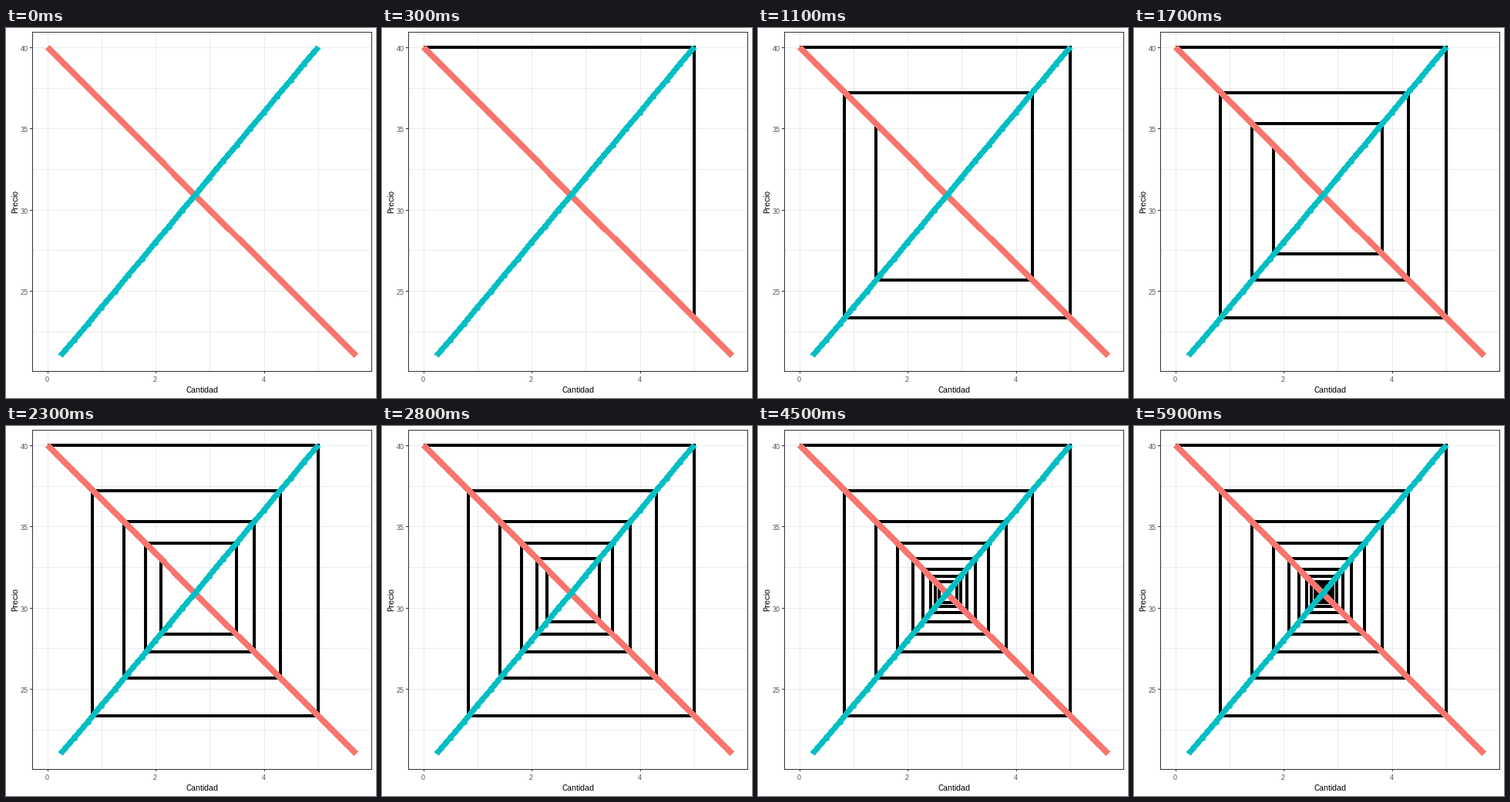
Write a matplotlib script that moves like this. It is 480 by 480 pixels and loops after 10000 ms.

```python
import matplotlib.pyplot as plt
import numpy as np
from matplotlib.animation import FuncAnimation
from matplotlib.patches import Rectangle

SIZE, DPI = 480, 100
FRAMES, INTERVAL = 100, 100
PERIODS = 35
LEFT, TOP, RIGHT, BOTTOM = 34, 5, 474, 445

plt.rcParams.update({
    "font.family": "Liberation Sans",
    "text.hinting": "native",
    "text.hinting_factor": 1,
})


def pt(px):
    return px * 72 / DPI


def x_px(q):
    return np.floor(54.4 + np.asarray(q) * 400 / 5.7)


def y_px(p):
    return np.floor(25.6 + (40 - np.asarray(p)) * 400 / 19)


def demand(q):
    return 40 - q * 10 / 3


def demand_quantity(p):
    return (40 - p) * 0.3


def supply_quantity(p):
    return (p - 20) / 4


fig = plt.figure(figsize=(SIZE / DPI, SIZE / DPI), dpi=DPI, facecolor="white")
ax = fig.add_axes([0, 0, 1, 1])
ax.set_xlim(0, SIZE)
ax.set_ylim(SIZE, 0)
ax.axis("off")


def bar(x, y, w, h, color, z):
    ax.add_patch(Rectangle((x, y), w, h, facecolor=color, linewidth=0,
                           antialiased=False, zorder=z))


def label(x, y, text, size, color, **kw):
    ax.text(x, y, text, fontsize=pt(size), color=color, zorder=6, **kw)


def stroke(x, y, color, width, z):
    line, = ax.plot(x, y, color=color, linewidth=pt(width), zorder=z,
                    antialiased=False, snap=False,
                    solid_capstyle="butt", solid_joinstyle="round")
    return line


def curve(quantity_at, color, z):
    """Thick line whose round joints bulge slightly below it."""
    prices = np.arange(21, 41)
    x, y = x_px(quantity_at(prices)), y_px(prices)
    stroke(x, y, color, 6, z)
    ax.plot(x[1:-1], y[1:-1] + 0.5, "o", color=color, markersize=pt(7),
            markeredgewidth=0, antialiased=False, snap=False, zorder=z)


# Panel: grid, border, ticks and labels
for q in range(6):
    bar(x_px(q), TOP, 1, BOTTOM - TOP, "#EBEBEB", 1)
for p in np.arange(22.5, 41, 2.5):
    bar(LEFT, y_px(p), RIGHT - LEFT, 1, "#EBEBEB", 1)
for x in (LEFT, RIGHT):
    bar(x, TOP, 1, BOTTOM - TOP + 1, "#333333", 5)
for y in (TOP, BOTTOM):
    bar(LEFT, y, RIGHT - LEFT + 1, 1, "#333333", 5)
for q in (0, 2, 4):
    bar(x_px(q), BOTTOM, 1, 3, "#333333", 5)
    label(x_px(q) - 0.5, 459, str(q), 9, "#4D4D4D", ha="center")
for p in (25, 30, 35, 40):
    bar(LEFT - 3, y_px(p), 3, 1, "#333333", 5)
    label(29, y_px(p) + 5, str(p), 9, "#4D4D4D", ha="right")
label(254, 473, "Cantidad", 11, "black", ha="center")
label(15, 225, "Precio", 11, "black", rotation=90, rotation_mode="anchor",
      ha="center", va="baseline")

curve(demand_quantity, "#F8766D", 3)
curve(supply_quantity, "#00BFC4", 4)

# Cobweb: each period moves across to supply, then jumps to demand
quantity = [0.0]
for _ in range(PERIODS):
    quantity.append(supply_quantity(demand(quantity[-1])))
price = [demand(q) for q in quantity]
starts = [round(t * (FRAMES - 1) / PERIODS) for t in range(PERIODS + 1)]
web = stroke([], [], "black", 4, 2)


def draw(frame):
    t = max(i for i, s in enumerate(starts) if s <= frame)
    qs, ps = [quantity[0]], [price[0]]
    for i in range(1, t + 1):
        qs += [quantity[i]] * 2
        ps += [price[i - 1], price[i]]
    if t < PERIODS:
        part = (frame - starts[t]) / (starts[t + 1] - starts[t])
        if part > 0:
            qs.append(quantity[t] + part * (quantity[t + 1] - quantity[t]))
            ps.append(price[t])
    web.set_data(x_px(qs), y_px(ps))
    return web,


anim = FuncAnimation(fig, draw, frames=FRAMES, interval=INTERVAL,
                     repeat=True, repeat_delay=0)
plt.show()
```
